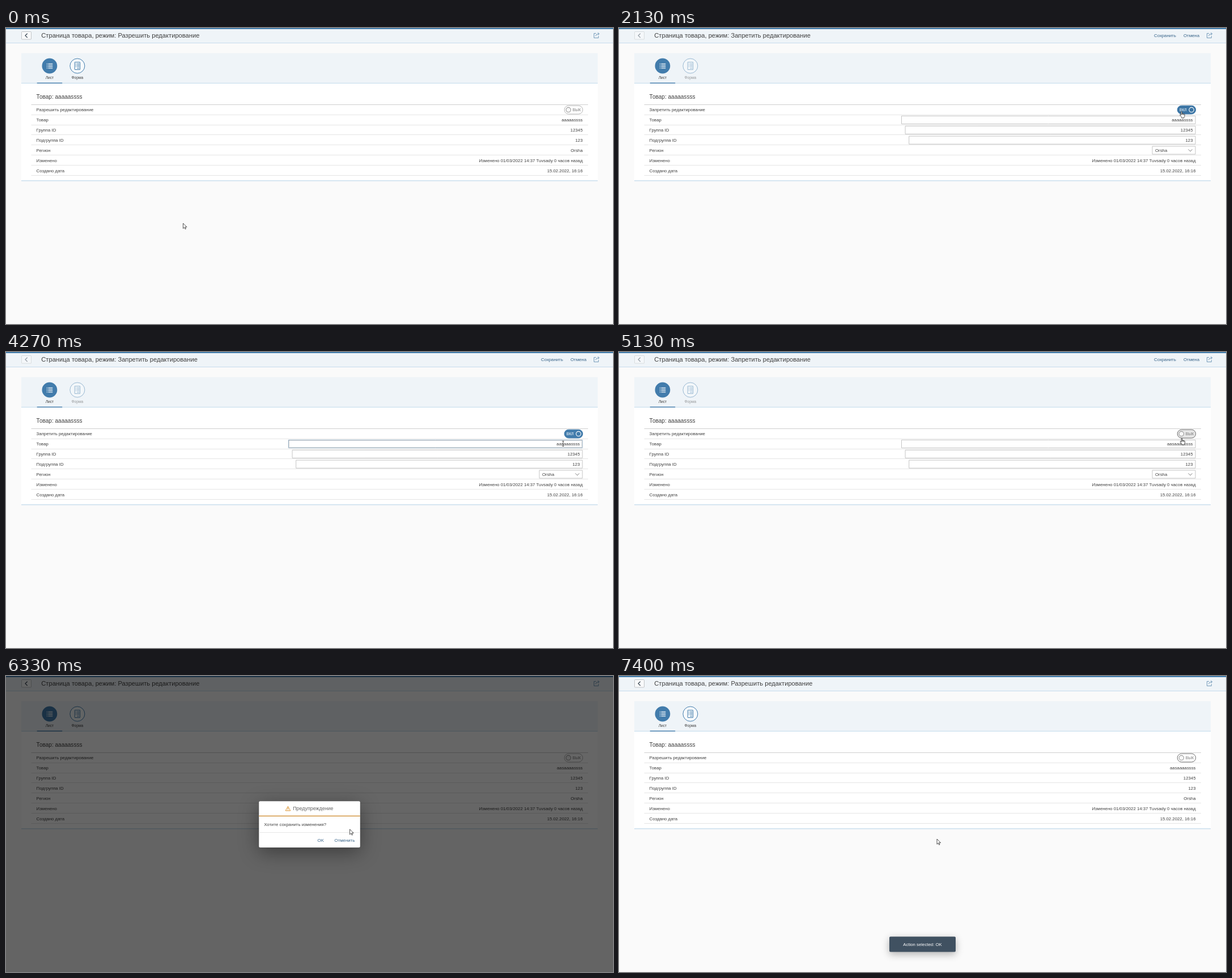
An HTML page with a canvas for the animation above (8000 ms loop, 1071x523 px).

```html
<!DOCTYPE html>
<html lang="ru">
<head>
<meta charset="utf-8">
<title>Страница товара</title>
<style>
html, body { margin: 0; width: 100%; height: 100%; overflow: hidden; background: #fafafa; }
canvas { display: block; width: 1071px; height: 523px; }
</style>
</head>
<body>
<canvas id="stage" width="1071" height="523"></canvas>
<script>
const ctx = document.getElementById('stage').getContext('2d');
const LOOP = 8000, TICKS_PER_MS = 0.015, SCALE = 1071 / 1920;
const BLUE = '#427cac', LINK = '#346187', PALE = '#c5dced', BAR = '#eff4f8', INK = '#404040';
const ROW_TOP = 135.6, ROW_H = 17.85, RIGHT = 1017.5;

// Pointer path: tick, x, y
const PATH = [
  [0, 312.5, 345], [1, 313, 345], [7, 370, 338], [13, 413, 330], [14, 410, 331], [18, 523.5, 314],
  [22, 770, 235], [26, 986, 142], [27, 989, 144], [30, 992.5, 147], [50, 992.5, 147],
  [56, 983, 162], [66, 983, 162], [71, 993, 152], [78, 993, 152], [86, 826, 181],
  [87, 820, 183], [92, 675, 245], [97, 561, 288], [120, 561, 288]
];

function pointerAt(tick) {
  const i = Math.max(1, PATH.findIndex(p => p[0] >= tick));
  const [t0, x0, y0] = PATH[i - 1], [t1, x1, y1] = PATH[i];
  const k = (tick - t0) / (t1 - t0);
  return [x0 + (x1 - x0) * k, y0 + (y1 - y0) * k];
}

function rect(x, y, w, h, color) {
  ctx.fillStyle = color;
  ctx.fillRect(x, y, w, h);
}

function text(str, x, y, size = 14, color = INK, align = 'left') {
  ctx.font = `${size * SCALE}px "Liberation Sans", Arial, sans-serif`;
  ctx.fillStyle = color;
  ctx.textAlign = align;
  ctx.fillText(str, x, y);
}

function line(points, color, width = 1) {
  ctx.beginPath();
  points.forEach(([x, y]) => ctx.lineTo(x, y));
  ctx.strokeStyle = color;
  ctx.lineWidth = width;
  ctx.stroke();
}

function box(x, y, w, h, r, fill, stroke, width = 1) {
  ctx.beginPath();
  ctx.roundRect(x, y, w, h, r);
  if (fill) { ctx.fillStyle = fill; ctx.fill(); }
  if (stroke) { ctx.strokeStyle = stroke; ctx.lineWidth = width; ctx.stroke(); }
}

function circle(x, y, r, fill, stroke, width = 1) {
  box(x - r, y - r, 2 * r, 2 * r, r, fill, stroke, width);
}

function faded(alpha, draw) {
  ctx.save();
  ctx.globalAlpha *= alpha;
  draw();
  ctx.restore();
}

function header(s) {
  rect(0, 0, 1071, 26, BAR);
  rect(0, 0, 1071, 2, BLUE);
  rect(0, 26, 1071, 1, PALE);
  faded(s.edit ? 0.5 : 1, () => {
    box(27.5, 6.5, 17, 13.5, 1, '#f9fafb', '#b5b8ba', 0.8);
    line([[37.7, 9.7], [34, 13.3], [37.7, 17]], '#34424e', 1.2);
  });
  const mode = s.allowTitle ? 'Разрешить' : 'Запретить';
  text(`Страница товара, режим: ${mode} редактирование`, 62.3, 17, 20);
  if (s.edit) {
    text('Сохранить', 944, 16.3, 14, LINK);
    text('Отмена', 996, 16.3, 14, LINK);
  }
  line([[1041, 9.5], [1037.5, 9.5], [1037.5, 17.5], [1045.3, 17.5], [1045.3, 14]], '#6690b3', 0.9);
  line([[1040.5, 14.5], [1041.5, 11.5], [1046.3, 10.2]], '#6690b3', 0.9);
  line([[1044, 8.2], [1046.7, 10.2], [1044.3, 12.5]], '#6690b3', 0.9);
}

function bullets(x, y, w, rows, gap, color) {
  for (let i = 0; i < rows; i++) {
    rect(x, y + i * gap, 1.3, 1.1, color);
    rect(x + 2.5, y + i * gap, w, 1.1, color);
  }
}

function tabs(s) {
  rect(27, 44.5, 1017, 53, BAR);
  rect(27, 97, 1017, 1.2, PALE);
  rect(54.7, 96.6, 44.5, 1.7, BLUE);
  circle(76.9, 67, 13.4, BLUE);
  bullets(71.8, 62.7, 8, 4, 2.6, '#fff');
  text('Лист', 76.9, 90, 12, INK, 'center');
  faded(s.edit ? 0.5 : 1, () => {
    circle(125.9, 67, 13, '#f7fafc', BLUE, 1);
    box(121.2, 60.3, 9.4, 13.2, 0.5, null, BLUE, 1);
    bullets(122.8, 62.5, 4, 3, 2.5, BLUE);
    rect(125.3, 70.5, 4, 1.1, BLUE);
    text('Форма', 125.9, 90, 12, INK, 'center');
  });
}

function toggle(s) {
  const on = s.on;
  const border = on > 0.5 ? BLUE : s.toggleFocus ? '#6d6d6d' : '#b4b4b4';
  const fill = on > 0.5 ? (s.hover ? '#3c75a4' : BLUE) : s.hover ? '#e6e6e6' : '#fff';
  box(985.2, 137.2, 32.4, 14.8, 7.4, fill, border, 1);
  const ring = on > 0.5 ? '#fff' : '#999';
  circle(992.3 + 17.8 * on, 144.6, 4.2, on > 0.5 ? fill : '#f7f7f7', ring, 1.1);
  if (on > 0.5) text('ВКЛ', 989, 147, 12, '#fff');
  else text('ВЫК', 999.8, 147, 12, '#777');
}

function field(x, row, value, focused) {
  const y = ROW_TOP + ROW_H * row + 2;
  box(x, y, 1017 - x, 14, 0, '#fff', focused ? '#8ea9bf' : '#bfbfbf', 0.9);
  if (focused) {
    ctx.setLineDash([1, 1]);
    box(x + 1, y + 1, 1015 - x, 12, 0, null, '#777', 0.6);
    ctx.setLineDash([]);
  }
  text(value, 1012.5, y + 9.8, 14, INK, 'right');
}

function list(s) {
  rect(27, 98.2, 1017, 171, '#fff');
  rect(27, 269.2, 1017, 1.3, PALE);
  text('Товар: aaaaassss', 53.6, 125, 18);
  rect(44.5, 135, 982.5, 1, '#cfcfcf');
  const rows = [
    [`${s.edit ? 'Запретить' : 'Разрешить'} редактирование`],
    ['Товар', s.product], ['Группа ID', '12345'], ['Подгруппа ID', '123'], ['Регион', 'Orsha'],
    ['Изменено', 'Изменено 01/03/2022 14:37 Tuvsady 0 часов назад'],
    ['Создано дата', '15.02.2022, 16:16']
  ];
  rows.forEach(([label, value], i) => {
    const y = ROW_TOP + ROW_H * i;
    rect(44.5, Math.round(y + ROW_H - 0.7), 982.5, 1, '#e5e5e5');
    text(label, 53.6, y + 11.8);
    if (!value) return;
    if (!s.edit || i > 4) text(value, RIGHT, y + 11.8, 14, INK, 'right');
    else if (i < 4) field(491.9 + 6.6 * i, i, value, i === 1 && s.inputFocus);
    else {
      box(941, y + 2, 76, 14, 0, '#fff', '#bfbfbf', 0.9);
      text(value, 946, y + 11.8);
      line([[1004.5, y + 7.3], [1008, y + 11], [1011.5, y + 7.3]], '#777', 0.9);
    }
  });
  toggle(s);
}

function shadowed(blur, drop, color, draw) {
  ctx.save();
  ctx.shadowColor = color;
  ctx.shadowBlur = blur;
  ctx.shadowOffsetY = drop;
  draw();
  ctx.restore();
}

function dialog(s) {
  shadowed(34, 8, 'rgba(0,0,0,.4)', () => box(446.3, 221.2, 178.5, 81.8, 2, '#fff'));
  const amber = '#d88a1c';
  ctx.beginPath();
  ctx.moveTo(497.5, 230.3);
  ctx.lineTo(501.8, 238);
  ctx.lineTo(493.2, 238);
  ctx.closePath();
  ctx.strokeStyle = amber;
  ctx.lineWidth = 0.9;
  ctx.stroke();
  rect(497, 232.7, 1, 2.6, amber);
  rect(497, 236, 1, 0.9, amber);
  text('Предупреждение', 506.2, 237.2, 16, '#666');
  rect(446.3, 246.7, 178.5, 1.4, '#cf8f35');
  text('Хотите сохранить изменения?', 455.2, 264.6);
  rect(446.3, 276, 178.5, 0.9, '#e5e5e5');
  if (s.okPressed) box(543.5, 283, 23.5, 14.5, 1, BLUE);
  else if (s.okHover) box(543.5, 283, 23.5, 14.5, 1, '#ebf1f6', '#c3d5e3', 0.6);
  text('OK', 555.2, 293, 14, s.okPressed ? '#fff' : LINK, 'center');
  text('Отменить', 579.6, 293, 14, LINK);
}

function toast() {
  shadowed(14, 4, 'rgba(0,0,0,.3)', () => box(477, 460.6, 117, 27, 2, '#405161'));
  text('Action selected: OK', 535.5, 476.7, 14, '#fff', 'center');
}

const ARROW = new Path2D('M0 0V16.5L4 13L6.6 18.6L9 17.5L6.5 12H11.8Z');
const HAND = new Path2D('M-1.5 1.5Q0 -.6 1.5 1.5V7.5Q3 6.5 4.3 8Q5.8 7.2 7 8.7Q8.5 8 9.8 10V15Q9.5 17.5 8 19V21.5H.5V19Q-2 16 -5 12.2Q-5.5 10 -3.3 10.5L-1.5 12.5Z');

function pointer(s) {
  const [x, y] = s.pointer;
  if (s.shape === 'beam') {
    line([[x, y - 4], [x, y + 4]], '#222', 0.8);
    line([[x - 1.5, y - 4.5], [x + 1.5, y - 4.5]], '#222', 0.8);
    line([[x - 1.5, y + 4.5], [x + 1.5, y + 4.5]], '#222', 0.8);
    return;
  }
  ctx.save();
  ctx.translate(x, y);
  ctx.scale(SCALE, SCALE);
  const shape = s.shape === 'hand' ? HAND : ARROW;
  ctx.fillStyle = '#fff';
  ctx.fill(shape);
  ctx.strokeStyle = '#222';
  ctx.lineWidth = 1.4;
  ctx.stroke(shape);
  if (s.shape === 'hand') ctx.stroke(new Path2D('M1.5 7V11.5M4.3 8V11.5M7 9V12'));
  ctx.restore();
}

function stateAt(tick) {
  const within = (a, b) => tick >= a && tick < b;
  const pointerHand = within(27, 52) || within(69, 78) || within(96, 111);
  return {
    edit: within(32, 79),
    allowTitle: !within(32, 78),
    on: tick === 30 || tick === 75 ? 0.4 : within(31, 75) ? 1 : 0,
    hover: within(27, 52) || within(69, 78),
    toggleFocus: within(29, 53) || within(74, 79) || tick >= 111,
    inputFocus: within(54, 74),
    product: tick < 62 ? 'aaaaassss' : tick < 65 ? 'aasaaassss' : 'aasaaaassss',
    veil: within(78, 111),
    dialogAlpha: within(78, 107) ? 1 : tick === 107 ? 0.45 : 0,
    okHover: tick >= 96,
    okPressed: within(105, 107),
    toast: tick >= 111,
    shape: within(53, 68) ? 'beam' : pointerHand ? 'hand' : 'arrow',
    pointer: pointerAt(tick)
  };
}

function draw(ms) {
  const s = stateAt(Math.floor(ms * TICKS_PER_MS + 0.1));
  rect(0, 0, 1071, 523, '#fafafa');
  header(s);
  tabs(s);
  list(s);
  if (s.veil) rect(0, 0, 1071, 523, 'rgba(0,0,0,.6)');
  if (s.dialogAlpha) faded(s.dialogAlpha, () => dialog(s));
  if (s.toast) toast();
  pointer(s);
}

let start;
function loop(now) {
  start ??= now;
  draw((now - start) % LOOP);
  requestAnimationFrame(loop);
}
draw(0);
requestAnimationFrame(loop);
</script>
</body>
</html>
```
